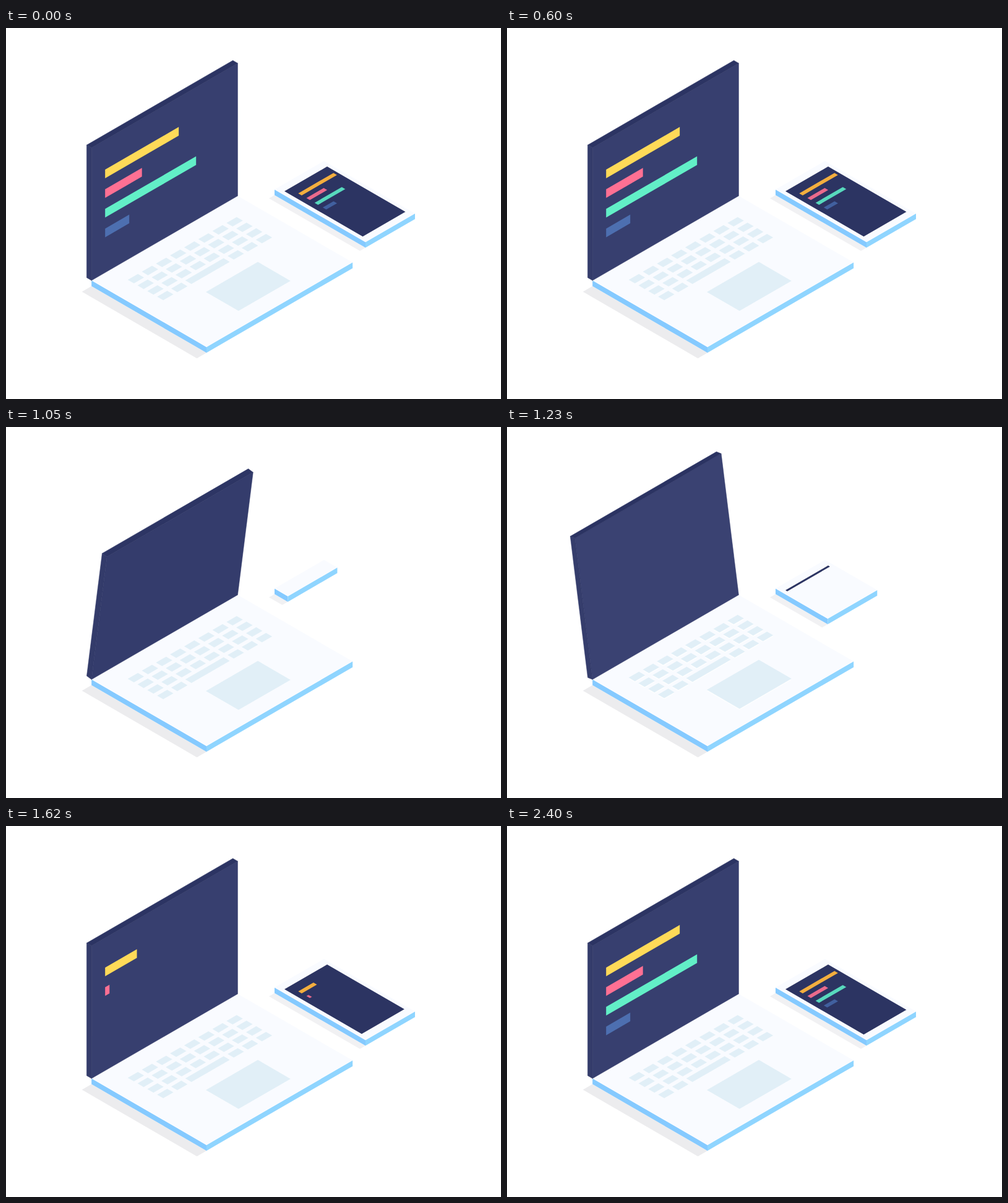
Write an HTML page that moves like this. It is 800 by 600 pixels and loops after 2.43 s.

```html
<!DOCTYPE html>
<html lang="en">
<head>
<meta charset="utf-8">
<title>Laptop and phone</title>
<style>
  html, body { margin: 0; width: 100%; height: 100%; overflow: hidden; background: #fff; }
  svg { display: block; width: 100vw; height: 100vh; }
</style>
</head>
<body>
<svg id="stage" viewBox="0 0 800 600"></svg>
<script>
const LOOP = 2430;
const SLOPE = 0.579;           // isometric rise per pixel of x
const OVERSHOOT = 1.82;
const stage = document.getElementById('stage');

// Isometric axes: u runs up-right, v runs down-right, both measured in x pixels.
const move = ([x, y], u, v, up = 0) => [x + u + v, y + (v - u) * SLOPE - up];
const clamp = x => Math.min(1, Math.max(0, x));
const span = (t, start, length) => clamp((t - start) / length);
const sine = x => (1 - Math.cos(Math.PI * x)) / 2;
const backOut = x => 1 + (OVERSHOOT + 1) * (x - 1) ** 3 + OVERSHOOT * (x - 1) ** 2;

function add(fill, parent = stage) {
  const el = document.createElementNS('http://www.w3.org/2000/svg', 'polygon');
  el.setAttribute('fill', fill);
  parent.appendChild(el);
  return el;
}

function group(parent = stage) {
  const el = document.createElementNS('http://www.w3.org/2000/svg', 'g');
  parent.appendChild(el);
  return el;
}

function shape(el, points) {
  el.setAttribute('points', points.map(p => p[0].toFixed(2) + ',' + p[1].toFixed(2)).join(' '));
}

function show(el, on) {
  el.setAttribute('visibility', on ? 'visible' : 'hidden');
}

const flat = (p, u, v) => [p, move(p, u, 0), move(p, u, v), move(p, 0, v)];
const wall = (a, b, h) => [a, b, [b[0], b[1] + h], [a[0], a[1] + h]];
const rgb = c => 'rgb(' + c.map(Math.round).join(',') + ')';
const mix = (a, b, k) => rgb(a.map((n, i) => n + (b[i] - n) * k));

// A slab lying on the ground: shadow, two visible sides and the top.
function slab(corner, thick, cast, shadowColor) {
  const g = group();
  const [shadow, left, right, top] =
    [shadowColor, '#85caff', '#8fd5ff', '#f9fbff'].map(c => add(c, g));
  return (u, v) => {
    const end = move(corner, 0, v);
    const a = [corner[0], corner[1] + thick];
    const b = [end[0], end[1] + thick];
    shape(shadow, [a, b, move(b, -cast, 0), move(a, -cast, 0)]);
    shape(left, wall(corner, end, thick));
    shape(right, wall(end, move(corner, u, v), thick));
    shape(top, flat(corner, u, v));
    show(g, v > 0.5);
  };
}

// Laptop base
const HINGE = [138.2, 408.3];
const WIDTH = 236.2, DEPTH = 185.8, HEIGHT = 214.6, LID = 9;
slab(HINGE, 9.3, 15.5, '#ececee')(WIDTH, DEPTH);

// Keyboard and touchpad, with a light layer below that shows when they lift
function drawKeys(color) {
  const g = group();
  const key = (x, y, u) => shape(add(color, g), flat([x, y], u, 10));
  for (let row = 0; row < 4; row++) {
    for (let i = 0; i < 8; i++) {
      const wide = row === 3 && i === 5;
      if (row === 3 && (i === 3 || i === 4)) continue;
      key(356.3 + row * 15.8 - i * 22.8, 315.2 + row * 9.1 + i * 13.15, wide ? 62 : 16.5);
    }
  }
  shape(add(color, g), flat([323, 427], 84, 52.8));
  return g;
}
drawKeys('#fdfeff');
const keys = drawKeys('#e1eff7');

// Laptop lid
const lid = group();
lid.setAttribute('stroke-width', '0.5');
lid.setAttribute('stroke-linejoin', 'round');
const [lidSide, lidFace, lidEnd] = ['#343c6b', '#373f6f', '#2c3463'].map(c => add(c, lid));

function paint(el, color) {
  el.setAttribute('fill', color);
  el.setAttribute('stroke', color);
}

function drawLid(deg) {
  const a = deg * Math.PI / 180, c = Math.cos(a), s = Math.sin(a);
  const k = LID / HEIGHT;
  const reach = p => move(p, 0, DEPTH * c, HEIGHT * s);
  const back = p => move(p, 0, -DEPTH * s * k, HEIGHT * c * k);
  const across = p => move(p, WIDTH, 0);
  const tip = reach(HINGE), heel = back(HINGE), outer = back(tip);
  const open = deg > 45;
  const near = open ? HINGE : heel, far = open ? tip : outer;
  shape(lidSide, [HINGE, tip, outer, heel]);
  shape(lidFace, [near, far, across(far), across(near)]);
  shape(lidEnd, [tip, outer, across(outer), across(tip)]);
  const turn = deg / 90;
  paint(lidSide, mix([45, 53, 98], [52, 60, 107], turn));
  paint(lidEnd, mix([53, 59, 105], [44, 52, 99], turn));
  const shade = (deg - 90) * 0.4;
  paint(lidFace, open ? rgb([55 + shade, 63 + shade, 111 + shade]) : '#2e3762');
  lidFace.setAttribute('stroke', open ? '#2a3262' : '#2e3762');
}

// Phone
const PHONE = [434, 261.2];
const drawPhone = slab(PHONE, 9, 9, '#f1f1f3');
const glass = add('#2c3462');

// Code lines: laptop length, phone length, laptop colour, phone colour
const lines = [
  [119, 57, '#ffda58', '#f3ae3e'],
  [59.5, 28, '#ff7093', '#ea6a8c'],
  [147, 44, '#62efc7', '#58d9bd'],
  [39, 17.5, '#4d6fb0', '#41609f']
].map(([big, small, bright, dim]) => ({
  big, small, onLaptop: add(bright), onPhone: add(dim)
}));

function drawLines(t) {
  lines.forEach((line, i) => {
    const k = sine(span(t, 1370 + i * 128, 550));
    const a = [160.2, 229 + i * 31.8];
    shape(line.onLaptop, wall(a, move(a, line.big * k, 0), 14));
    shape(line.onPhone, flat([472.3 + i * 13.2, 267.4 + i * 7.65], line.small * k, 5.6));
    show(line.onLaptop, k > 0);
    show(line.onPhone, k > 0);
  });
}

function draw(t) {
  // The first part of the loop holds the finished picture.
  if (t < 900) t = LOOP;
  const deg = 90 * backOut(span(t, 910, 480));
  const lift = Math.max(0, deg - 90) / 4.6;
  keys.setAttribute('transform', 'translate(0 ' + (-lift).toFixed(2) + ')');
  drawLid(deg);
  drawPhone(80, 147 * sine(span(t, 900, 605)));
  const lit = sine(span(t, 1185, 470));
  shape(glass, flat([450, 264], 69, 126.5 * lit));
  show(glass, lit > 0);
  drawLines(t);
}

const begin = performance.now();
function tick() {
  draw((performance.now() - begin) % LOOP);
  requestAnimationFrame(tick);
}
tick();
</script>
</body>
</html>
```
